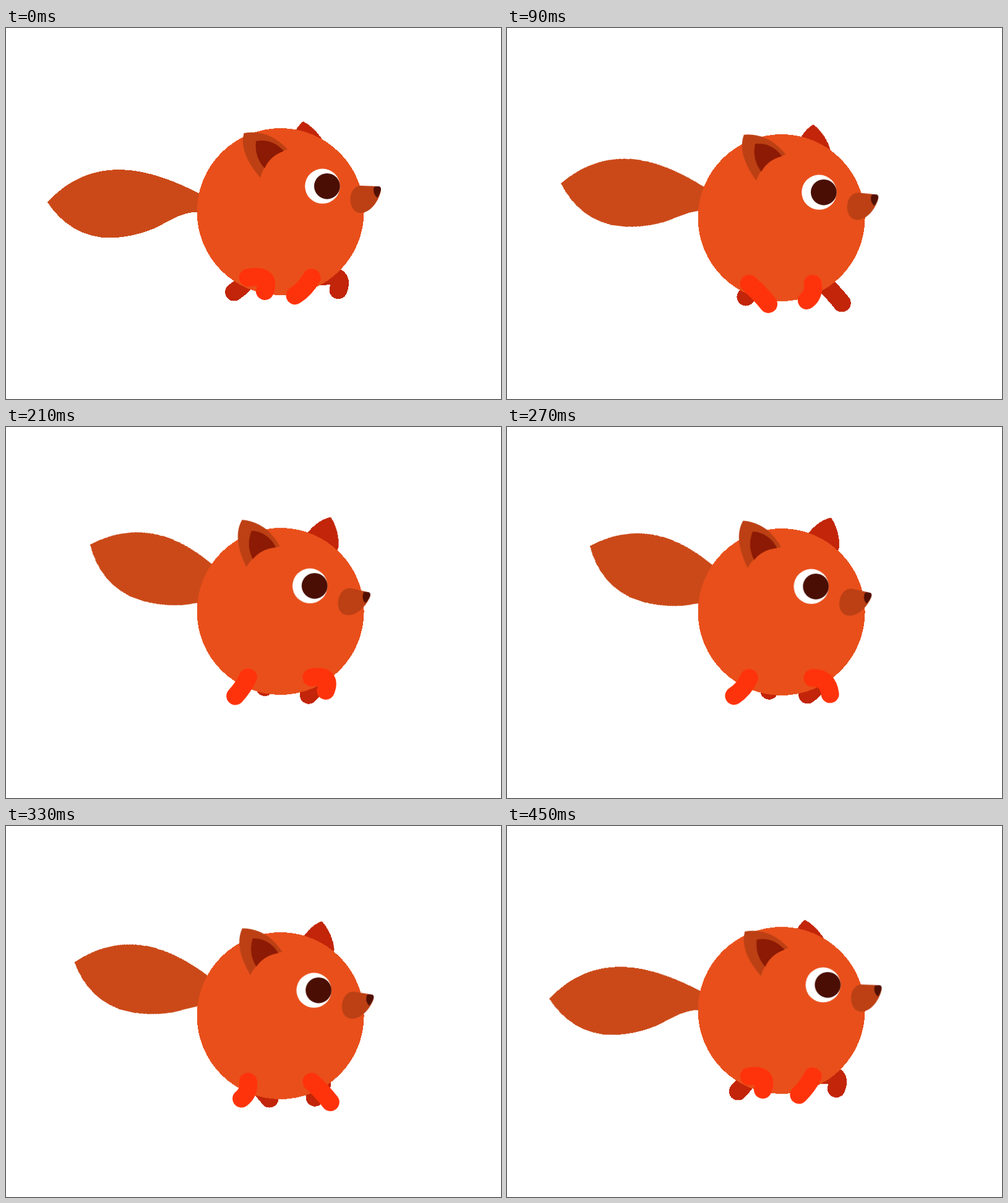
Animation of 800 by 600 pixels, one loop 0.48 s. Source, as an HTML page:

```html
<!DOCTYPE html>
<html lang="en">
<head>
<meta charset="utf-8">
<title>Running fox</title>
<style>
  html, body { margin: 0; width: 100%; height: 100%; overflow: hidden; background: #fff; }
  svg { display: block; width: 100vw; height: 100vh; }

  /* Sine-like swings: two bounces per stride, one sway per stride */
  .bounce, .drift, .sway {
    animation: bounce 120ms cubic-bezier(.364, 0, .636, 1) -3.6ms infinite alternate;
  }
  .drift { animation-name: drift; }
  .sway { animation-duration: 240ms; }

  .tail { animation-name: tail; transform-origin: 368px 436px; }
  .far-ear { animation-name: far-ear; transform-origin: 514.7px 234px; }
  .ear { animation-name: ear; transform-origin: 462.7px 148px; }
  .eye { animation-name: eye; }
  .snout { animation-name: snout; transform-origin: 575px 277px; }

  @keyframes bounce { from { transform: translateY(0); } to { transform: translateY(11px); } }
  @keyframes drift { from { transform: translateY(0); } to { transform: translateY(4.5px); } }
  @keyframes tail { from { transform: rotate(0deg); } to { transform: rotate(20.15deg); } }
  @keyframes far-ear { from { transform: rotate(-28.6deg); } to { transform: rotate(1.4deg); } }
  @keyframes ear { from { transform: rotate(0deg); } to { transform: rotate(15.5deg); } }
  @keyframes eye { from { transform: translateX(0); } to { transform: translateX(-20.8px); } }
  @keyframes snout {
    from { transform: translate(0, 0) rotate(0deg); }
    to { transform: translate(-20.3px, 4.7px) rotate(11deg); }
  }

  /* Hard outline against the white ground */
  .tail, .far-ear, .far, .body { shape-rendering: crispEdges; }

  .leg {
    fill: none; stroke: #ff330b; stroke-width: 29; stroke-linecap: round;
    animation: stride 480ms linear infinite;
  }
  .far { stroke: #c22509; }
  .late { animation-delay: -244ms; }

  /* Hip at 0,0, bend as control point, foot at the end */
  @keyframes stride {
    0%, 100% { d: path("M0 0Q38 -7 27 21.5"); }
    7.1%   { d: path("M0 0Q25 -1 28 26"); }
    12.5%  { d: path("M0 0Q21 7 31.5 30.5"); }
    19.1%  { d: path("M0 0Q17 15 31.2 33"); }
    25%    { d: path("M0 0Q12 16.5 23.5 33.5"); }
    31.6%  { d: path("M0 0Q5 16.5 10 33"); }
    37.5%  { d: path("M0 0Q-2 17 -6.5 32"); }
    44.6%  { d: path("M0 0Q-9 17 -22 30"); }
    50.8%  { d: path("M0 0Q-10 18 -27 29"); }
    56.3%  { d: path("M0 0Q-8 18 -24.5 29"); }
    69%    { d: path("M0 0Q2 18 -10.7 27.2"); }
    81.5%  { d: path("M0 0Q18 3 7.5 24.5"); }
    93.75% { d: path("M0 0Q32 -5 22 21.5"); }
  }
</style>
</head>
<body>
<svg viewBox="0 0 800 600">
  <g class="drift">
    <path class="sway tail" fill="#cb4918" d="M67 282C100 245 140 229 183 229C230 229 280 251 311 267L345 283V296L309 297.5C280 299 265 312 240 324C220 333 190 339.5 168 339.5C125 339.5 90 317 67 282Z"/>
  </g>
  <g class="bounce">
    <path class="sway far-ear" fill="#c22509" d="M524 144.5Q538 166 537 192L530 216L476 186Q497 150 524 144.5Z"/>
    <g transform="translate(395.5 398)"><path class="leg far late" d="M0 0Q-10 18 -27 29"/></g>
    <g transform="translate(510 402)"><path class="leg far" d="M0 0Q38 -7 27 21.5"/></g>
    <circle class="body" cx="443.6" cy="297" r="135" fill="#e94f1b"/>
    <g transform="translate(391.3 403.7)"><path class="leg" d="M0 0Q38 -7 27 21.5"/></g>
    <g transform="translate(494 403.7)"><path class="leg late" d="M0 0Q-10 18 -27 29"/></g>
    <g class="sway ear">
      <path fill="#bc4014" d="M384.5 170Q424 163 455 196Q421 207 411 242Q376 202 384.5 170Z"/>
      <path fill="#8c1a04" d="M404 183Q430 178 449 199Q426.5 207 418 227Q401 208 404 183Z"/>
    </g>
    <g class="sway eye">
      <circle cx="511.5" cy="255.8" r="28.3" fill="#fff"/>
      <circle cx="518.9" cy="255.8" r="20.9" fill="#4a0e04"/>
    </g>
    <g class="sway snout">
      <path fill="#bc4014" d="M574 255L602 256Q606 257 606 262C604 277 590 299 573.5 299C562 299 556.5 288 556.5 277C556.5 264 564 255 574 255Z"/>
      <path fill="#521003" d="M596 256.5L602 256Q606 256 606 261Q604.5 269 600 274.5Q592 267 594.5 258Z"/>
    </g>
  </g>
</svg>
</body>
</html>
```
